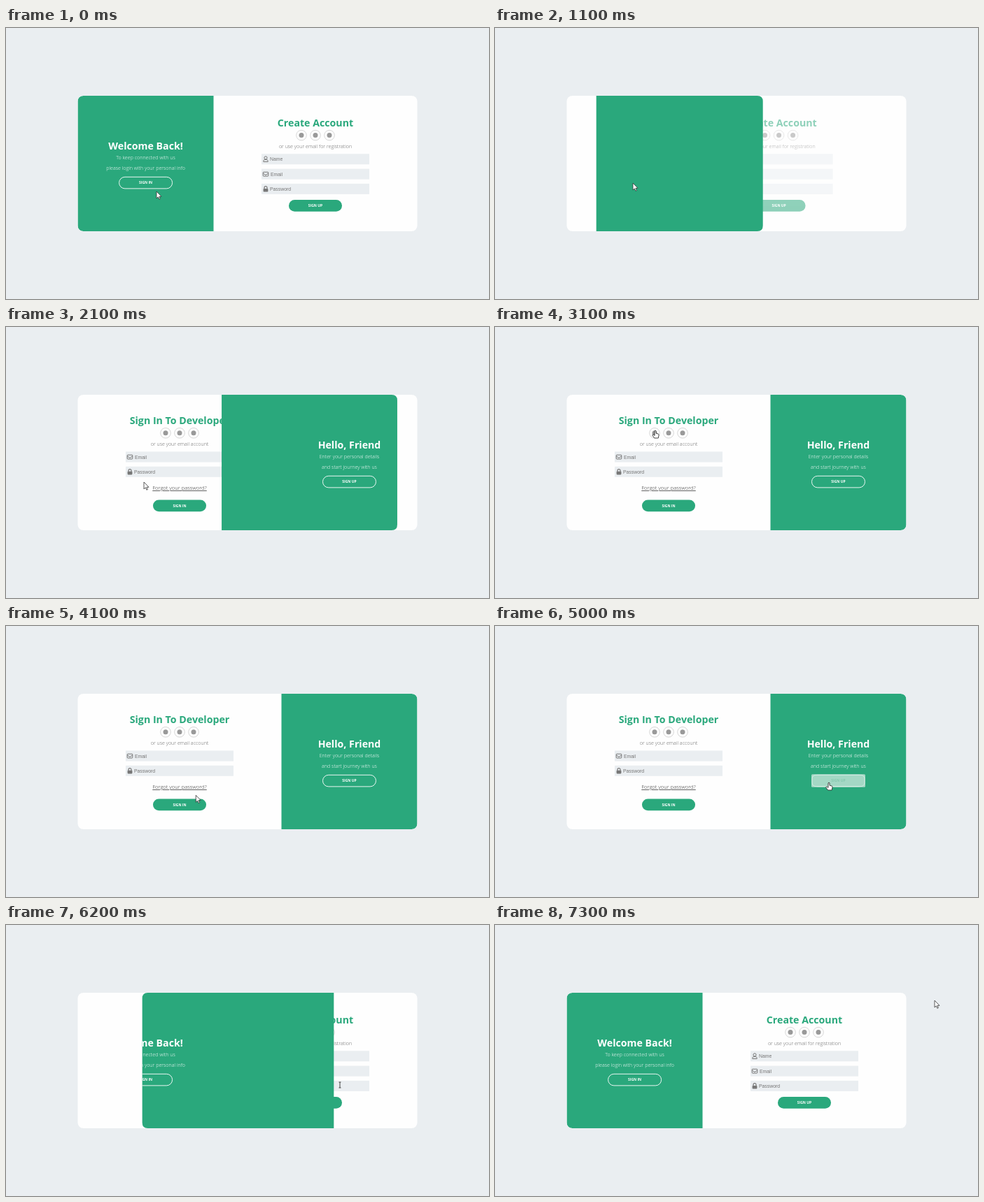
These frames come from a looping animation (690x388 px, 7400 ms). An HTML page:

```html
<!DOCTYPE html>
<html lang="en">
<head>
<meta charset="utf-8">
<title>Sliding sign-in panel</title>
<style>
  html, body { margin: 0; width: 100%; height: 100%; overflow: hidden; background: #eaeef1; }
  svg { display: block; width: 100vw; height: 100vh; }
  text { font-family: "Open Sans", sans-serif; text-anchor: middle; }
  .title { font-size: 14.2px; font-weight: 700; }
  .note { font-size: 7.1px; font-weight: 300; }
  .link { font-size: 7.6px; font-weight: 300; fill: #333; text-decoration: underline; }
  .label { font-size: 5px; font-weight: 700; fill: #fff; }
  .hint { font: 6.85px "Liberation Sans", Arial, sans-serif; text-anchor: start; fill: #757575; }
</style>
</head>
<body>
<svg id="stage" viewBox="0 0 690 388">
  <defs>
    <clipPath id="cardClip"><rect x="102.5" y="97" width="485" height="194" rx="8"/></clipPath>
    <clipPath id="panelClip"><path id="panelEdge"/></clipPath>
    <g id="user" fill="none" stroke="#777" stroke-width="1">
      <circle r="2.1" cy="-2"/>
      <path d="M-3.2 3.6V2.6Q-3.2 .7 -1.2 .7H1.2Q3.2 .7 3.2 2.6V3.6Z"/>
    </g>
    <g id="mail" fill="none" stroke="#777" stroke-width="1">
      <rect x="-3.8" y="-2.9" width="7.6" height="5.8" rx=".8"/>
      <path d="M-3.8 -1.2L0 1.3L3.8 -1.2"/>
    </g>
    <g id="lock">
      <rect x="-3.4" y="-.6" width="6.8" height="4.6" rx=".8" fill="#777"/>
      <path d="M-2 0V-1.8A2 2 0 0 1 2 -1.8V0" fill="none" stroke="#777" stroke-width="1.2"/>
    </g>
  </defs>
  <rect width="690" height="388" fill="#eaeef1"/>
  <rect x="102.5" y="97" width="485" height="194" rx="8" fill="#fefefe"/>
  <g clip-path="url(#cardClip)">
    <g id="signUp"></g>
    <g id="signIn"></g>
    <path id="panel" fill="#2aa87c"/>
    <g clip-path="url(#panelClip)">
      <g id="welcome"></g>
      <g id="hello"></g>
    </g>
  </g>
  <g id="cursor" stroke-linejoin="round">
    <path id="arrow" d="M0 0V10L2.3 7.9L3.9 11.3L5.4 10.6L3.9 7.3H7Z" fill="#fff" stroke="#333" stroke-width=".8"/>
    <path id="hand" d="M-1 .8Q0 -.6 1 .8V4.2L4 5Q5.2 5.4 5 6.8L4.2 11H-1.4L-4.2 7.2Q-4.2 5.6 -2.6 6.2L-1 7.4Z" fill="#fff" stroke="#333" stroke-width=".9"/>
    <path id="beam" d="M-1.5 -4H1.5M0 -4V4M-1.5 4H1.5" fill="none" stroke="#333" stroke-width=".9"/>
  </g>
</svg>
<script>
const GREEN = '#2aa87c';
const LOOP = 7400;
const TRAVEL = 291;
const toRight = { start: 630, time: 2350 };
const toLeft = { start: 5480, time: 1800 };
const $ = id => document.getElementById(id);
const clamp = v => Math.min(1, Math.max(0, v));
const smooth = v => v * v * (3 - 2 * v);

// Building blocks
const text = (cls, x, y, str, fill) =>
  `<text class="${cls}" x="${x}" y="${y}"${fill ? ` fill="${fill}"` : ''}>${str}</text>`;

const field = (x, y, icon, str, textX) =>
  `<rect x="${x}" y="${y}" width="154" height="15" fill="#eaeef1"/>
   <use href="#${icon}" x="${x + 6}" y="${y + 7.6}"/>` +
  text('hint', x + textX, y + 10, str);

const socials = (cx, cy) => [-20, 0, 20].map(dx =>
  `<circle cx="${cx + dx}" cy="${cy}" r="7.3" fill="none" stroke="#ccc" stroke-width=".8"/>
   <circle cx="${cx + dx}" cy="${cy}" r="3.5" fill="#999"/>`).join('');

const solidButton = (cx, y, str) =>
  `<rect x="${cx - 38}" y="${y}" width="76" height="16.6" rx="8.3" fill="${GREEN}"/>` +
  text('label', cx, y + 10.1, str);

const side = (cx, title, line1, line2, button) =>
  text('title', cx, 174, title, '#fff') +
  text('note', cx, 187.8, line1, '#fff') +
  text('note', cx, 203, line2, '#fff') +
  `<rect x="${cx - 38}" y="213.3" width="76" height="16.6" rx="8.3" fill="none" stroke="#fff" stroke-width=".9"/>` +
  text('label', cx, 223.4, button) +
  `<g class="hover">
    <rect x="${cx - 38.5}" y="212.3" width="77" height="18.4" rx="1.5" fill="#a4d8c5"/>
    <rect x="${cx - 37.5}" y="213.4" width="75" height="16.2" rx="5" fill="none" stroke="#fff" stroke-width=".7" opacity=".7"/>
    <text class="label" x="${cx}" y="223.4" style="fill:#86c9b0">${button}</text>
  </g>`;

$('signUp').innerHTML =
  text('title', 442, 141, 'Create Account', GREEN) +
  socials(442, 153.6) +
  text('note', 442, 172, 'or use your email for registration', '#666') +
  field(365, 180.3, 'user', 'Name', 12) +
  field(365, 201.6, 'mail', 'Email', 13) +
  field(365, 222.9, 'lock', 'Password', 12) +
  solidButton(442, 246.1, 'SIGN UP');

$('signIn').innerHTML =
  text('title', 248, 139, 'Sign In To Developer', GREEN) +
  socials(248, 151.8) +
  text('note', 248, 170, 'or use your email account', '#666') +
  field(171, 178.5, 'mail', 'Email', 13) +
  field(171, 199.8, 'lock', 'Password', 12) +
  text('link', 248, 233, 'Forgot your password?') +
  solidButton(248, 247.6, 'SIGN IN');

$('welcome').innerHTML = side(199.6, 'Welcome Back!', 'To keep connected with us',
  'please login with your personal info', 'SIGN IN');
$('hello').innerHTML = side(490.5, 'Hello, Friend', 'Enter your personal details',
  'and start journey with us', 'SIGN UP');

// cubic-bezier(.25, .1, .25, 1)
function ease(x) {
  let lo = 0, hi = 1;
  for (let i = 0; i < 22; i++) {
    const s = (lo + hi) / 2, r = 1 - s;
    if (.75 * r * r * s + .75 * r * s * s + s * s * s < x) lo = s; else hi = s;
  }
  const r = 1 - lo;
  return .3 * r * r * lo + 3 * r * lo * lo + lo ** 3;
}

// The panel stretches while it travels
const stretch = u => .275 * (u < .42 ? smooth((u / .42) ** .85) : 1 - smooth((u - .42) / .58));

function panelPath(l, r, roundRight) {
  return roundRight
    ? `M${l} 97H${r - 8}Q${r} 97 ${r} 105V283Q${r} 291 ${r - 8} 291H${l}Z`
    : `M${r} 97H${l + 8}Q${l} 97 ${l} 105V283Q${l} 291 ${l + 8} 291H${r}Z`;
}

// time, x, y, pointer shape from then on
const trail = [
  [0, 215, 234, 'arrow'], [150, 215, 234, 'arrow'], [350, 203, 225, 'hand'],
  [550, 197, 222, 'hand'], [630, 197, 222, 'arrow'], [2500, 197, 222, 'arrow'],
  [2850, 224, 152, 'hand'], [3100, 229, 148, 'hand'], [3500, 264, 148, 'hand'],
  [3650, 262, 165, 'arrow'], [4000, 240, 245, 'arrow'], [4750, 472, 225, 'hand'],
  [4900, 477, 224, 'hand'], [5480, 477, 224, 'arrow'], [6140, 477, 229, 'beam'],
  [7200, 477, 229, 'arrow'], [7290, 628, 108, 'arrow'], [LOOP, 628, 108, 'arrow']
];

function drawCursor(t) {
  let i = 0;
  while (i < trail.length - 2 && t >= trail[i + 1][0]) i++;
  const [t0, x0, y0, kind] = trail[i], [t1, x1, y1] = trail[i + 1];
  const k = kind === 'arrow' && t0 === 5480 ? 0 : (t - t0) / (t1 - t0);
  $('cursor').setAttribute('transform', `translate(${x0 + (x1 - x0) * k} ${y0 + (y1 - y0) * k})`);
  for (const id of ['arrow', 'hand', 'beam']) $(id).style.display = id === kind ? '' : 'none';
}

function setForm(id, shift, alpha) {
  $(id).setAttribute('transform', `translate(${shift} 0)`);
  $(id).setAttribute('opacity', clamp(alpha));
}

function render(t) {
  const right = t >= toRight.start && t < toLeft.start;
  const move = t < toRight.start ? { start: -1e5, time: 1 } : right ? toRight : toLeft;
  const u = clamp((t - move.start) / move.time);
  const lead = u < 1 ? ease(u) : 1;
  const back = lead - stretch(u);
  const l = right ? 102.5 + TRAVEL * back : 393.5 - TRAVEL * lead;
  const r = right ? 296.5 + TRAVEL * lead : 587.5 - TRAVEL * back;
  const d = panelPath(l, r, right);
  $('panel').setAttribute('d', d);
  $('panelEdge').setAttribute('d', d);

  const gone = 1 - 1.6 * lead;
  setForm('signUp', right ? -123 * lead : 0, right ? gone : 1);
  setForm('signIn', right ? 0 : 123 * lead, right ? 1 : gone);

  $('welcome').style.display = right ? 'none' : '';
  $('hello').style.display = right ? '' : 'none';
  const hover = (id, from, to) =>
    $(id).querySelector('.hover').setAttribute('opacity', t < to ? clamp((t - from) / 200) : 0);
  hover('welcome', 320, toRight.start);
  hover('hello', 4730, toLeft.start);
  drawCursor(t);
}

const begin = performance.now();
function tick() {
  render((performance.now() - begin) % LOOP);
  requestAnimationFrame(tick);
}
tick();
</script>
</body>
</html>
```
